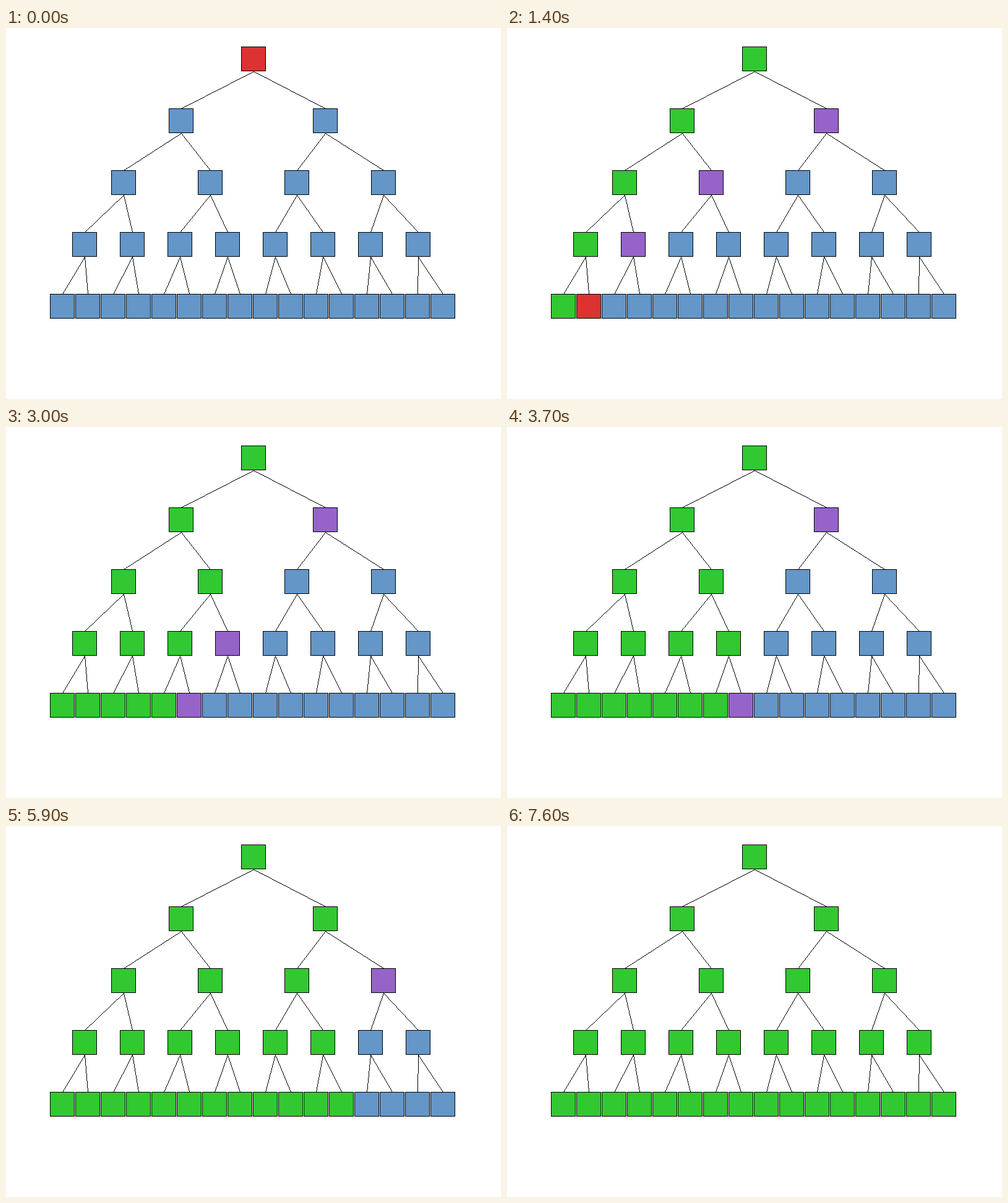
Write an HTML page with a canvas that moves like this. It is 800x600 px and loops after 7700 ms.

```html
<!DOCTYPE html>
<html lang="en">
<head>
<meta charset="utf-8">
<title>Depth-first traversal</title>
<style>
  html, body { margin: 0; width: 100%; height: 100%; overflow: hidden; background: #fff; }
  canvas { display: block; }
</style>
</head>
<body>
<canvas id="stage" width="800" height="600"></canvas>
<script>
const ctx = document.getElementById('stage').getContext('2d');
const BLUE = '#6496c8', RED = '#dc3232', GREEN = '#32c832', PURPLE = '#9664c8';
const LEVELS = 5, SIZE = 40, STEP_MS = 100;

// Heap order: the children of node i are 2i + 1 and 2i + 2.
const nodes = [];
for (let level = 0; level < LEVELS; level++) {
  const count = 2 ** level;
  const gap = Math.floor(700 / (count + 1));
  for (let i = 0; i < count; i++) {
    nodes.push({ x: 50 + gap * (i + 1), y: 30 + 100 * level });
  }
}
const childrenOf = i => [2 * i + 1, 2 * i + 2].filter(c => c < nodes.length);

// Each step is a full list of node colours.
const steps = [];
const colors = nodes.map(() => BLUE);
function paint(ids, color) {
  ids.forEach(i => colors[i] = color);
  steps.push(colors.slice());
}
function visit(i) {
  const children = childrenOf(i);
  paint([i], RED);
  paint([i], GREEN);
  if (children.length) paint(children, PURPLE);
  children.forEach(visit);
}
visit(0);

// One-pixel line without smoothing.
function drawLine(x0, y0, x1, y1) {
  const n = Math.max(Math.abs(x1 - x0), Math.abs(y1 - y0));
  for (let k = 0; k <= n; k++) {
    ctx.fillRect(Math.round(x0 + (x1 - x0) * k / n), Math.round(y0 + (y1 - y0) * k / n), 1, 1);
  }
}

function draw(fills) {
  ctx.fillStyle = '#fff';
  ctx.fillRect(0, 0, 800, 600);
  ctx.fillStyle = '#000';
  nodes.forEach((p, i) => childrenOf(i).forEach(c =>
    drawLine(p.x, p.y + SIZE, nodes[c].x, nodes[c].y)));
  nodes.forEach((p, i) => {
    const left = p.x - SIZE / 2;
    ctx.fillStyle = '#000';
    ctx.fillRect(left, p.y, SIZE, SIZE);
    ctx.fillStyle = fills[i];
    ctx.fillRect(left + 1, p.y + 1, SIZE - 2, SIZE - 2);
  });
}

const start = performance.now();
let shown = -1;
function tick() {
  const elapsed = Math.max(0, performance.now() - start);
  const step = Math.floor(elapsed / STEP_MS) % steps.length;
  if (step !== shown) draw(steps[shown = step]);
  requestAnimationFrame(tick);
}
tick();
</script>
</body>
</html>
```
